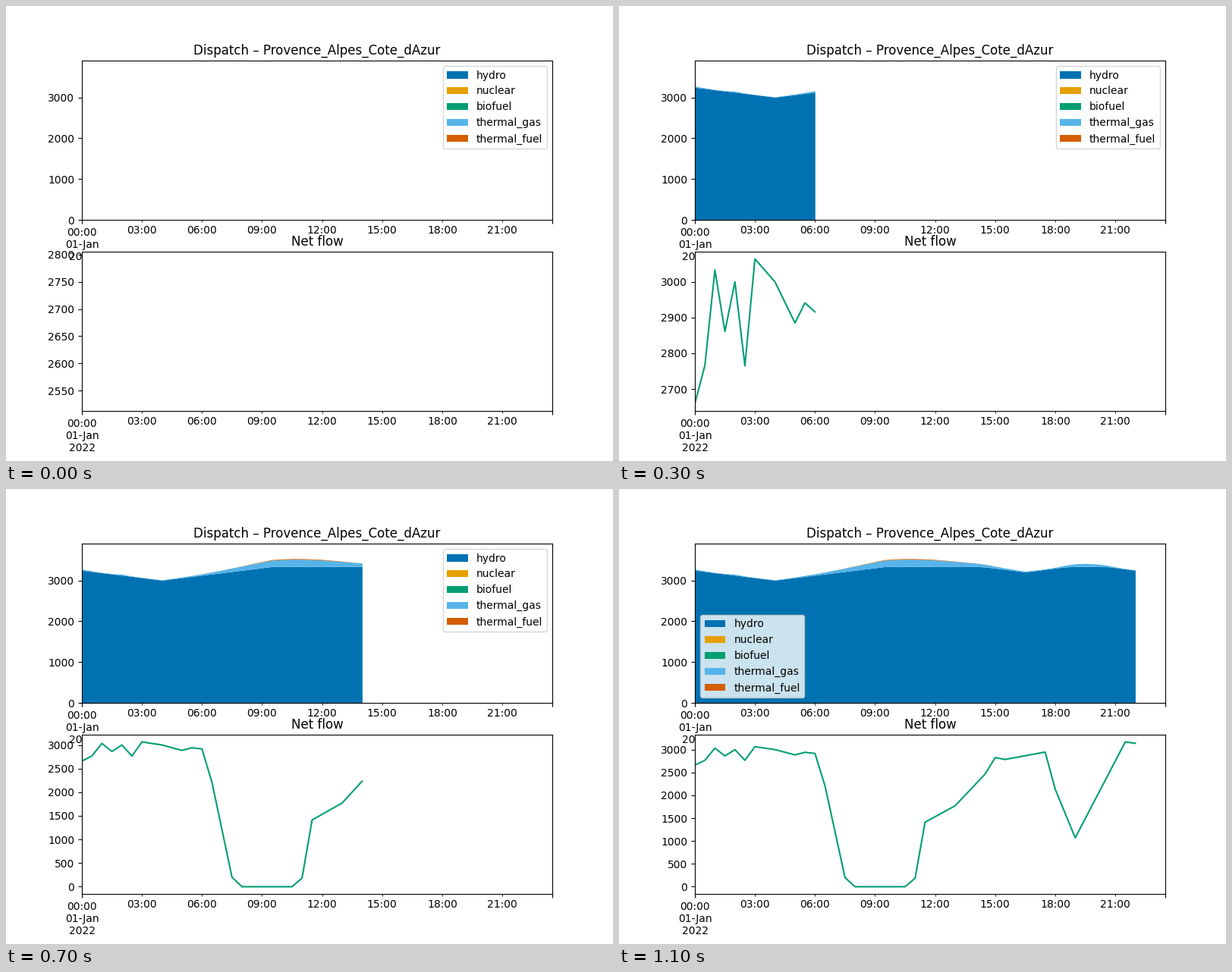
A matplotlib script for the animation above (1200 ms loop, 800 by 600 pixels).

```python
import numpy as np
import matplotlib.pyplot as plt
from matplotlib.animation import FuncAnimation

FRAMES, STEP, LAST = 12, 4, 47
CAPACITY, RAMP = 3342, 30.2  # hydro limit, change per half-hour
COLORS = {
    "hydro": "#0072B2",
    "nuclear": "#E69F00",
    "biofuel": "#009E73",
    "thermal_gas": "#56B4E9",
    "thermal_fuel": "#D55E00",
}

slots = np.arange(STEP * (FRAMES - 1) + 1)  # half-hours since midnight


def valley(center, low):
    return low + RAMP * abs(slots - center)


def bump(center, width, height):
    return height * np.exp(-((slots - center) / width) ** 2 / 2)


# Hydro ramps out of each low until it reaches capacity; gas covers the peaks.
hydro = np.minimum.reduce([valley(8, 3008), valley(33, 3210),
                           valley(LAST, 3163), np.full(len(slots), CAPACITY)])
gas = (bump(0, 1, 28) + bump(4, 0.7, 25)
       + bump(21.5, 5.3, 178) + bump(39, 1.8, 75))
fuel = bump(21.5, 3.5, 17)
none = np.zeros(len(slots))
layers = [hydro, none, none, gas, fuel]

# Turning points of the flow: restless night, midday stop, evening dip.
night = [(0, 2659), (1, 2766), (2, 3033), (3, 2861), (4, 3000), (5, 2765),
         (6, 3064), (8, 3000), (10, 2885), (11, 2941), (12, 2916)]
midday = [(13, 2207), (15.2, 0), (21.85, 0), (23, 1412), (26, 1771)]
evening = [(29, 2466), (30, 2825), (31, 2785), (35, 2947), (36, 2135),
           (38, 1070), (43, 3168), (44, 3138)]
flow = np.interp(slots, *zip(*night, *midday, *evening))

fig, (top, bottom) = plt.subplots(2, 1, figsize=(8, 6), dpi=100)


def time_axis(ax):
    ax.set_xlim(0, LAST)
    ax.set_xticks([0, LAST], ["00:00\n01-Jan\n2022", ""])
    hours = range(3, 24, 3)
    ax.set_xticks([2 * h for h in hours], [f"{h:02d}:00" for h in hours],
                  minor=True)


top.set_title("Dispatch – Provence_Alpes_Cote_dAzur")
top.set_ylim(0, 3905)
bottom.set_title("Net flow")
for ax in (top, bottom):
    time_axis(ax)

line, = bottom.plot([], [], color=COLORS["biofuel"])
areas = []


def update(i):
    n = STEP * i + 1
    while areas:
        areas.pop().remove()
    base = none
    for (name, color), layer in zip(COLORS.items(), layers):
        upper = base + layer
        areas.append(top.fill_between(slots[:n], base[:n], upper[:n],
                                      color=color, linewidth=0, label=name))
        base = upper
    # The legend moves once the areas reach its corner.
    top.legend(handles=areas, loc="upper right" if i < 10 else "lower left")

    line.set_data(slots[:n], flow[:n])
    bottom.relim()
    bottom.autoscale_view(scalex=False)


anim = FuncAnimation(fig, update, frames=FRAMES, interval=100,
                     init_func=lambda: update(0), repeat=True, repeat_delay=0)
plt.show()
```
